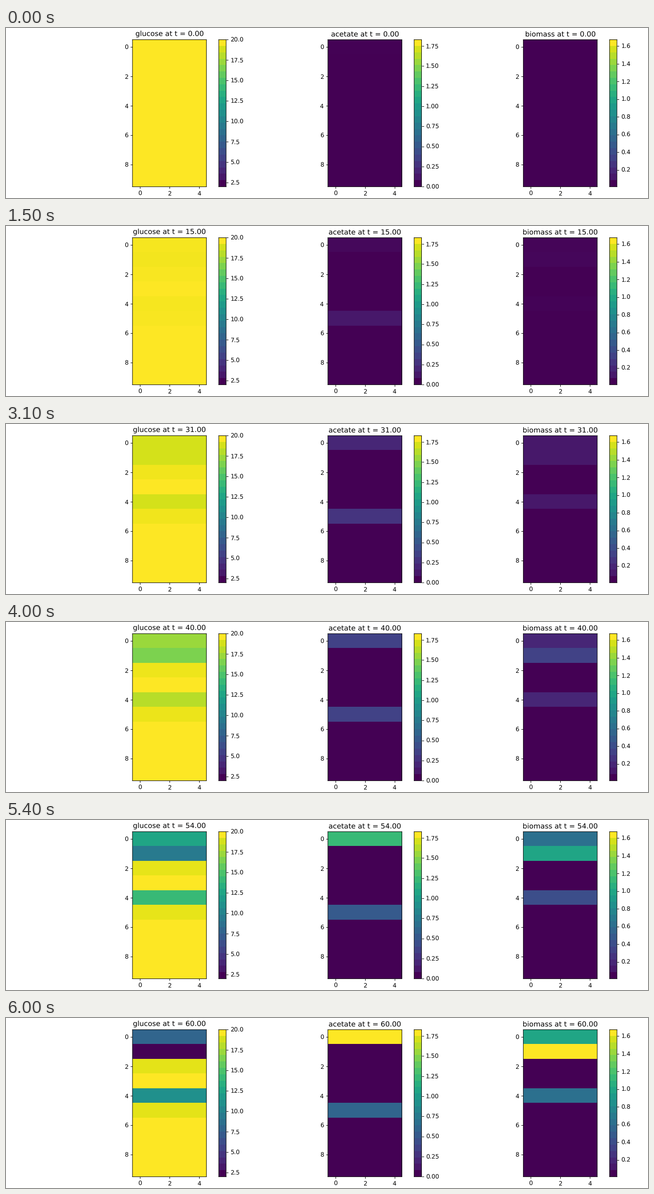
Recreate the animation shown at these times as a matplotlib script. Size 1280 by 341 pixels, loop 6.1 s.

```python
import numpy as np
import matplotlib.pyplot as plt
from matplotlib.animation import FuncAnimation

W, H, DPI = 1280, 341, 64
PX = 72 / DPI  # points per pixel
CELL = 29.5
TOP, LEFT, STEP, BAR_DX = 23.4, 252.15, 389.6, 172.0
BANDS = 23
T_END = 60
CMAP = plt.get_cmap("viridis")

plt.rcParams.update({
    "font.family": "DejaVu Sans",
    "font.size": 11.85 * PX,
    "text.hinting": "no_hinting",
    "axes.linewidth": 0.95 * PX,
    "axes.titlesize": 14.22 * PX,
    "axes.titlepad": 7.1 * PX,
})
for side in ("xtick", "ytick"):
    plt.rcParams.update({
        f"{side}.major.size": 4.15 * PX,
        f"{side}.major.pad": 4.15 * PX,
        f"{side}.major.width": 0.95 * PX,
    })


def growth(t, k, end, limit=0.0):
    """Exponential rise reaching `end` at T_END, optionally slowing down."""
    e = np.exp(k * (t - T_END))
    return end * e / (1 + limit * e) * (1 + limit)


def consumed(t, k, end):
    return growth(t, k, end) - growth(0, k, end)


def glucose(t):
    v = np.full(10, 20.0)
    v[0] -= consumed(t, 0.0769, 12.32)
    v[1] -= consumed(t, 0.0823, 18.15)
    v[2] -= 0.0120 * t
    v[4] -= consumed(t, 0.0702, 9.14)
    v[5] -= 0.0125 * t
    return v


def acetate(t):
    v = np.zeros(10)
    v[0] = growth(t, 0.092, 1.829, 0.4)
    v[5] = 0.00965 * t
    return v


def biomass(t):
    v = np.full(10, 0.01)
    v[0] = growth(t, 0.0769, 1.007)
    v[1] = growth(t, 0.0853, 1.671)
    v[4] = growth(t, 0.0696, 0.65)
    return v


def shade(f):
    """Viridis in even steps, left smooth in the first and last band."""
    f = np.clip(f, 0, 1)
    band = np.floor(f * BANDS)
    inner = (band > 0) & (band < BANDS - 1)
    return CMAP(np.where(inner, (band + 0.5) / BANDS, f))


def add_axes(x, w):
    h = 10 * CELL
    ax = fig.add_axes([x / W, 1 - (TOP + h) / H, w / W, h / H])
    for spine in ax.spines.values():
        spine.set_snap(False)
    return ax


class Panel:
    def __init__(self, i, name, model, lo, hi, ticks, fmt):
        self.name, self.model, self.lo, self.hi = name, model, lo, hi
        x = LEFT + i * STEP
        self.ax = add_axes(x, 5 * CELL)
        self.im = self.ax.imshow(self.colors(0), aspect="auto",
                                 interpolation="nearest")
        self.ax.set_xticks([0, 2, 4])
        self.ax.set_yticks(range(0, 10, 2))

        bar = add_axes(x + BAR_DX, CELL / 2)
        levels = (np.arange(BANDS) + 0.5) / BANDS
        levels[0], levels[-1] = 0, 1
        bar.imshow(CMAP(levels)[:, None], origin="lower", aspect="auto",
                   interpolation="nearest", extent=(0, 1, lo, hi))
        bar.set_xticks([])
        bar.yaxis.tick_right()
        bar.set_yticks(ticks, [fmt % v for v in ticks])
        bar.set_ylim(lo, hi)

    def colors(self, t):
        f = (self.model(t) - self.lo) / (self.hi - self.lo)
        return np.repeat(shade(f)[:, None], 5, axis=1)

    def show(self, t):
        self.im.set_data(self.colors(t))
        self.ax.set_title(f"{self.name} at t = {t:.2f}")


fig = plt.figure(figsize=(W / DPI, H / DPI), dpi=DPI, facecolor="white")
panels = [
    Panel(0, "glucose", glucose, 1.98, 20.0, np.arange(1, 9) * 2.5, "%.1f"),
    Panel(1, "acetate", acetate, 0.0, 1.829, np.arange(8) * 0.25, "%.2f"),
    Panel(2, "biomass", biomass, 0.01, 1.671, np.arange(1, 9) * 0.2, "%.1f"),
]


def update(n):
    for p in panels:
        p.show(float(n))
    return []


anim = FuncAnimation(fig, update, frames=T_END + 1, interval=100,
                     repeat=True, repeat_delay=0, blit=False)
plt.show()
```
